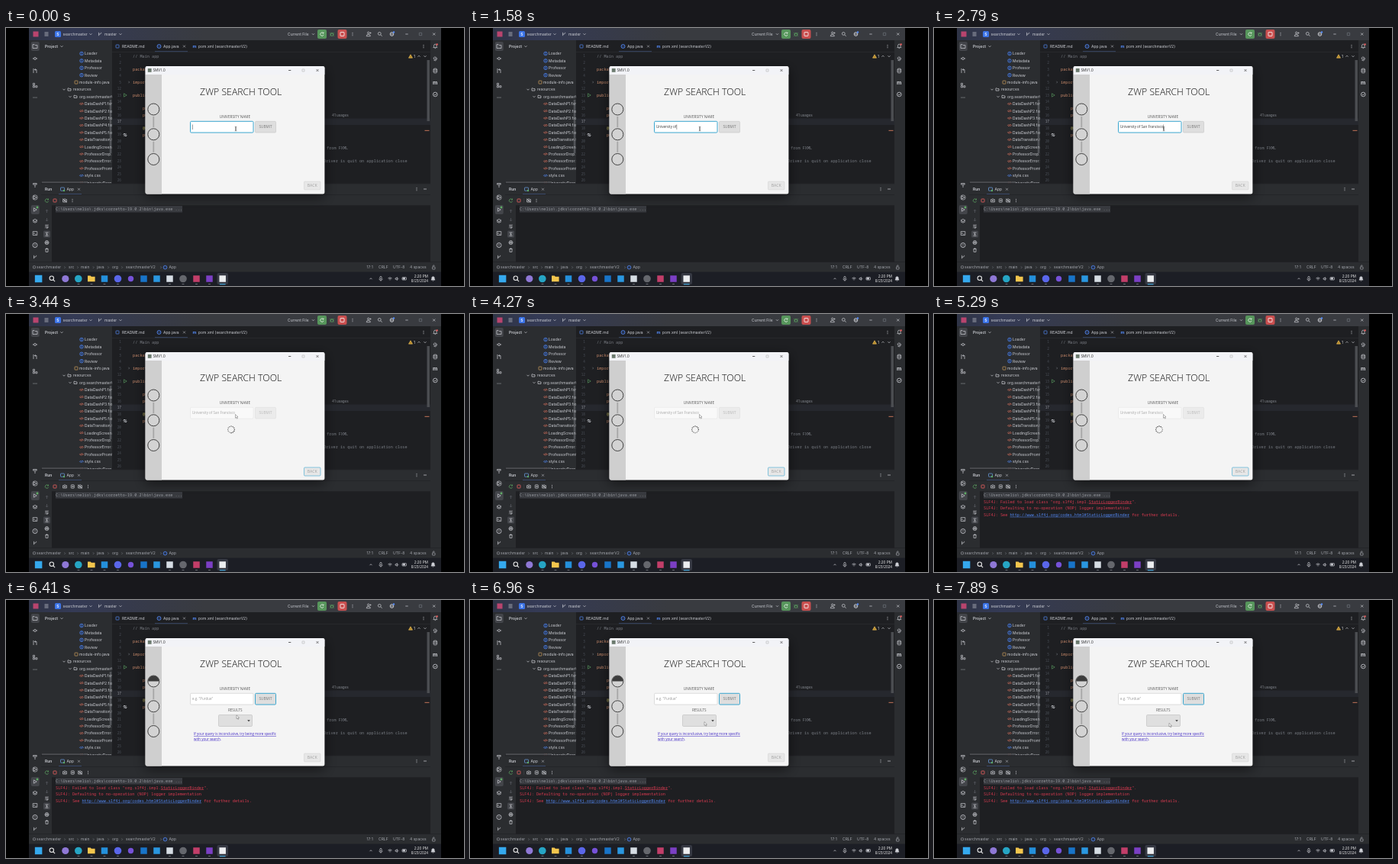
Recreate the animation shown at these times as an HTML page with a canvas. Size 600 by 338 pixels, loop 7.99 s.

```html
<!DOCTYPE html>
<html lang="en">
<head>
<meta charset="utf-8">
<style>
html, body { margin: 0; width: 100%; height: 100%; overflow: hidden; background: #000; }
canvas { display: block; width: 600px; height: 338px; }
</style>
</head>
<body>
<canvas id="stage" width="600" height="338"></canvas>
<script>
const LOOP = 7990, TYPE_START = 370, CHAR_MS = 89.5, TOOLBAR = 2300,
      SUBMIT = 2970, LOG = 4830, RESULT = 5900;
const LEFT = 30, WIDE = 540;
const QUERY = 'University of San Francisco';
const UI = 'Inter, sans-serif', SANS = '"Open Sans", sans-serif', MONO = '"Noto Sans Mono", monospace';
const LIGHT = '#ced0d6', DIM = '#6f737a', BLUE = '#548af7', GREEN = '#57965c', RED = '#db5c5c',
      PANEL = '#2b2d30', DARK = '#1e1f22', TAB_LINE = '#3b4b6b', SCROLL = '#4b4d51', FOCUS = '#3aa6cf';
const stage = document.getElementById('stage');
const ctx = stage.getContext('2d');

// Shaped at ten times the size so that small glyph advances stay exact.
function text(str, x, y, color = LIGHT, size = 5, family = UI, weight = 400, align = 'left') {
  ctx.save();
  ctx.translate(x, y);
  ctx.scale(.1, .1);
  ctx.font = `${weight} ${size * 10}px ${family}`;
  ctx.textAlign = align;
  ctx.fillStyle = color;
  ctx.fillText(str, 0, 0);
  ctx.restore();
}
const mono = (str, x, y, color) => text(str, x, y, color, 5.22, MONO);
const label = (str, x, y, color = '#555', size = 4.7) => text(str, x, y, color, size, SANS, 400, 'center');

function rect(x, y, w, h, fill, r = 0, stroke, lw = .7) {
  ctx.beginPath();
  ctx.roundRect(x, y, w, h, r);
  if (fill) { ctx.fillStyle = fill; ctx.fill(); }
  if (stroke) { ctx.strokeStyle = stroke; ctx.lineWidth = lw; ctx.stroke(); }
}
function disc(x, y, r, fill, stroke, lw = .8) {
  ctx.beginPath();
  ctx.arc(x, y, r, 0, 7);
  if (fill) { ctx.fillStyle = fill; ctx.fill(); }
  if (stroke) { ctx.strokeStyle = stroke; ctx.lineWidth = lw; ctx.stroke(); }
}
function icon(d, x, y, stroke = LIGHT, fill, lw = .7) {
  const p = new Path2D(d);
  ctx.save();
  ctx.translate(x, y);
  if (fill) { ctx.fillStyle = fill; ctx.fill(p); }
  if (stroke) { ctx.strokeStyle = stroke; ctx.lineWidth = lw; ctx.stroke(p); }
  ctx.restore();
}

const ICON = {
  down: 'M-1.5-.7L0 .8 1.5-.7', up: 'M-1.5.7L0-.8 1.5.7', right: 'M-.6-1.3L.7 0-.6 1.3',
  menu: 'M-2.5-2h5M-2.5 0h5M-2.5 2h5', cross: 'M-1.5-1.5l3 3M1.5-1.5l-3 3',
  folder: 'M-3-2.4h2.2l1 1h2.8v3.9h-6z', smallFolder: 'M-2-1.6h1.5l.6.7h1.9v2.5h-4z',
  branch: 'M-1.4-2.2v4.4M1.6-2.2v1q0 1.2-3 1.5',
  commit: 'M-3.2 0h1.7M1.5 0h1.7M1.5 0a1.5 1.5 0 1 0-3 0a1.5 1.5 0 1 0 3 0',
  pull: 'M-2-3v6M2 3v-4.5h-2.5l1.2-1.2M-.5-1.5l1.2 1.2',
  blocks: 'M-2.6-2.6h2.1v2.1h-2.1zM-2.6.7h2.1v2.1h-2.1zM.8.7h2.1v2.1h-2.1z',
  search: 'M1.2-.6a1.9 1.9 0 1 0-3.8 0a1.9 1.9 0 1 0 3.8 0M.7.8l2 2',
  bigSearch: 'M2.2-.8a2.7 2.7 0 1 0-5.4 0a2.7 2.7 0 1 0 5.4 0M1.4 1.2l2.4 2.4',
  person: 'M1.1-1.6a1.3 1.3 0 1 0-2.6 0a1.3 1.3 0 1 0 2.6 0M-2.8 2.7q.2-2.5 2.6-2.5t2.6 2.5zM2.5-2.5v2M1.5-1.5h2',
  rerun: 'M1.8-1.2a2.2 2.2 0 1 0 .3 2M2-2.5v1.5h-1.5', play: 'M-1.6-2.2L2.2 0-1.6 2.2z',
  bug: 'M-1.6-.8h3.2v1.6a1.6 1.7 0 0 1-3.2 0zM-1-.9q1-2 2 0M-2.8-1.6l1.2.8M2.8-1.6l-1.2.8M-2.9.7h1.2M1.7.7h1.2M-2.6 2.6l1.1-.9M2.6 2.6l-1.1-.9',
  camera: 'M-2.4-1.4h1.2l.6-.8h1.2l.6.8h1.2v3.4h-4.8zM.9.2a.9.9 0 1 0-1.8 0a.9.9 0 1 0 1.8 0',
  hammer: 'M-2.4-2.5h4.6v1.6h-4.6zM0-.8v3.8', layers: 'M-3-1l3-1.6 3 1.6-3 1.6zM-3 .6l3 1.6 3-1.6',
  terminal: 'M-2.8-2.4h5.6v4.8h-5.6zM-1.6-1l1 1-1 1M.3 1.2h1.4',
  bell: 'M-2.5 1.6h5l-.8-1.3v-1.4a1.7 1.7 0 0 0-3.4 0v1.4zM-.6 2.6h1.2',
  data: 'M-2.3-2a2.3.9 0 0 1 4.6 0v4a2.3.9 0 0 1-4.6 0zM-2.3-2a2.3.9 0 0 0 4.6 0M-2.3 0a2.3.9 0 0 0 4.6 0',
  spiral: 'M0 0q1-1 1 .4t-2 .6-.9-2.2 3-.4.6 3.2-3.6.6',
  arrowUp: 'M0 2v-4M-1.5-.5L0-2 1.5-.5', arrowDown: 'M0 2v-4M-1.5.5L0 2 1.5.5',
  wrap: 'M-2.3-1.8h4.6M-2.3 0h3.6q1.2.9 0 1.8h-1.6M.6.9l-1 .9 1 .9M-2.3 1.8h1',
  scroll: 'M-2-2h4M-2 2.2h4M0-1.4v2.4M-1.1 0L0 1.1 1.1 0',
  printer: 'M-1.4-.8v-1.4h2.8v1.4M-1.4 1.2h-1v-2h4.8v2h-1M-1.4.5h2.8v1.8h-2.8z',
  bin: 'M-2-1.5h4M-.7-1.6v-.7h1.4v.7M-1.5-1.4v3.7h3v-3.7',
  wifi: 'M-2.5-.6q2.5-2.2 5 0M-1.5.6q1.5-1.4 3 0M-.4 1.6h.8',
  sound: 'M-2-.7h1l1.4-1.2v3.8l-1.4-1.2h-1zM1.3-1q.9 1 0 2',
  code: 'M-1.2-1.2l-1.2 1.2 1.2 1.2M1.2-1.2l1.2 1.2-1.2 1.2M.4-1.5l-.8 3',
  beam: 'M-1.2-2.8q1.2 0 1.2.7v4.2q0 .7-1.2.7M1.2-2.8q-1.2 0-1.2.7v4.2q0 .7 1.2.7',
  arrow: 'M0 0v4.8l1.1-1 .8 1.8.9-.4-.8-1.8h1.5z'
};
const column = (names, x, ys, color) => names.forEach((n, i) => icon(ICON[n], x, ys[i], color));
function dots(x, y, flat) {
  for (let i = -1; i < 2; i++) disc(x + (flat ? i * 2 : 0), y + (flat ? 0 : i * 1.8), .5, LIGHT);
}

function titleBar() {
  const g = ctx.createLinearGradient(LEFT, 0, 260, 0);
  g.addColorStop(0, '#2f3446');
  g.addColorStop(.25, '#343a55');
  g.addColorStop(1, '#393b40');
  rect(LEFT, 0, WIDE, 16, g);
  rect(35.5, 4.5, 7, 7, '#b8446e');
  icon(ICON.menu, 53, 8);
  rect(64, 4, 8, 8, '#3c74e8', 1.5);
  text('S', 68, 9.8, '#fff', 5, UI, 600, 'center');
  text('searchmaster', 74.5, 9.8);
  icon(ICON.down, 111, 8);
  icon(ICON.branch, 123, 8);
  text('master', 129, 9.8);
  icon(ICON.down, 150, 8);
  text('Current File', 369, 9.8);
  icon(ICON.down, 402.5, 8);
  rect(408, 2, 12, 12, '#57965c', 2);
  icon(ICON.rerun, 414, 8, '#fff');
  icon(ICON.bug, 427, 8, '#5fad65');
  rect(434.5, 2, 12, 12, '#c94f4f', 2);
  rect(438, 5.5, 5, 5, null, .6, '#fff', .8);
  dots(454, 8);
  icon(ICON.person, 475, 8);
  icon(ICON.search, 490, 8);
  disc(505.5, 8, 2.3, null, LIGHT, 1);
  disc(505.5, 8, .8, null, LIGHT, .6);
  disc(508, 5.5, 1.2, BLUE);
  icon('M-1.7 0h3.4', 525, 8);
  rect(541.3, 6.3, 3.4, 3.4, null, 0, DIM);
  icon(ICON.cross, 560.7, 8);
}

function projectPanel() {
  text('Project', 51, 25.6, LIGHT, 5, UI, 600);
  icon(ICON.down, 73, 24);
  ctx.save();
  ctx.beginPath();
  ctx.rect(46, 29, 93, 175);
  ctx.clip();
  const files = ['DataDashP1.fxml', 'DataDashP2.fxml', 'DataDashP3.fxml', 'DataDashP4.fxml', 'DataDashP5.fxml',
    'DataTransition.fxml', 'LoadingScreen.fxml', 'ProfessorDrop.fxml', 'ProfessorError.fxml',
    'ProfessorPromt.fxml', 'style.css', 'UniversityDrop.fxml'];
  const rows = ['Loader', 'Metadata', 'Professor', 'Review', 'module-info.java', 'resources', 'org.searchmasterV2', ...files];
  rows.forEach((name, i) => {
    const y = 33.5 + i * 9.4, x = i === 5 ? 88 : i === 4 || i === 6 ? 96 : 103;
    text(name, x, y + 1.9);
    if (i < 4) {
      disc(99, y, 2.3, '#25324d', BLUE, .7);
      text('C', 99, y + 1.3, BLUE, 3.6, UI, 400, 'center');
    } else if (i === 4) {
      rect(90, y - 2, 4, 4, null, .5, '#d0a35c');
    } else if (i < 7) {
      icon(ICON.down, x - 12, y);
      icon(ICON.smallFolder, x - 5, y);
    } else {
      icon(ICON.code, 99, y, name.endsWith('css') ? BLUE : '#d9705c', null, .8);
    }
  });
  rect(135.7, 94, 2.6, 70, 'rgba(140,142,148,.4)');
  rect(47, 201.3, 58, 2.2, SCROLL);
  ctx.restore();
}

function editor() {
  rect(139, 16, 417, 188, DARK);
  rect(139, 118.4, 417, 8.6, '#26282e');
  rect(144, 22, 4, 4, null, .5, BLUE);
  text('README.md', 152, 25.6);
  disc(200.5, 24, 2.5, '#25324d', BLUE);
  text('App.java', 206, 25.6);
  icon(ICON.cross, 233.5, 24, LIGHT, null, .5);
  rect(195, 30.3, 43, 1, TAB_LINE);
  text('m', 247, 25.6, BLUE, 5.5, UI, 700, 'center');
  text('pom.xml (searchmasterV2)', 252, 25.6);
  dots(547, 24);
  rect(139, 31.3, 417, .5, '#303236');
  for (let i = 0; i < 20; i++) {
    const n = i < 5 ? i + 1 : i + 7;
    text(n, 151, 38.4 + i * 8.57, n === 17 ? '#a1a3ab' : '#4b5059', 4.4, MONO, 400, 'right');
  }
  icon(ICON.play, 156, 88, GREEN, null, .7);
  icon(ICON.right, 161, 71, DIM);
  icon(ICON.arrowUp, 155, 140, LIGHT);
  icon(ICON.arrowDown, 157, 140, LIGHT);
  mono('// Main app', 166, 38.8, '#7a7e85');
  const key = '#cf8e6d';
  mono('package', 166, 55.9, key);
  mono('import', 166, 73, key);
  mono('public', 166, 90.2, key);
  mono('public', 179, 107.3, key);
  mono('public', 179, 115.9, key);
  mono('@Override', 179, 133, '#b3ae60');
  mono('public', 179, 141.6, key);
  text('41 usages', 427, 115.9, '#868a91', 4.6);
  mono('from FXML', 420, 158.8, '#7a7e85');
  mono('Driver is quit on application close', 416, 176, '#7a7e85');
  icon('M0-2.2l2.5 4.4h-5z', 530, 37, '#f2c55c', '#b98d2c', .6);
  text('1', 534, 38.8);
  icon(ICON.up, 541, 37);
  icon(ICON.down, 549, 37);
  rect(551.5, 42, 3.5, 80, SCROLL);
  rect(548.5, 133.8, 6, 1.2, '#a8654f');
}

function strips() {
  rect(32.8, 18, 11, 12, '#43454a', 2);
  column(['folder', 'commit', 'pull', 'blocks'], 38, [24, 40, 56, 75]);
  dots(38, 91, true);
  rect(32.8, 232, 11, 12, '#43454a', 2);
  column(['hammer', 'play', 'play', 'layers', 'terminal', 'branch'], 38, [206, 222, 238, 253, 269, 300]);
  disc(38, 222, 3.2, null, LIGHT, .6);
  disc(41, 235, 1.4, '#5fad65');
  disc(38, 284.5, 3, null, LIGHT);
  icon('M0-1.5v1.8M0 1v.7', 38, 284.5);
  column(['bell', 'spiral', 'data'], 562.3, [24, 40, 56]);
  disc(564.6, 21.5, 1.3, RED);
  text('m', 562.3, 74, LIGHT, 7, UI, 700, 'center');
  disc(562.3, 87, 2.8, null, LIGHT);
  icon('M-1.3 0l1 1 1.7-1.8', 562.3, 87);
}

function runPanel(t) {
  rect(46, 203.5, 510, 103, PANEL);
  rect(60, 232.3, 496, 74.2, DARK);
  rect(46, 203.5, 510, .7, DARK);
  rect(46, 218.2, 510, .5, DARK);
  text('Run', 51, 212.8, LIGHT, 5, UI, 600);
  rect(71.5, 209, 5, 4.2, null, .6, '#6ea4e8');
  disc(76, 213, 1.2, '#5fad65');
  text('App', 79.5, 212.8);
  icon(ICON.cross, 95.5, 211.3, LIGHT, null, .5);
  rect(69, 217, 30, 1, TAB_LINE);
  icon('M-2 0h4', 549, 211);
  dots(538, 211);
  icon(ICON.rerun, 53.5, 226, '#5fad65');
  rect(62, 224, 4, 4, null, .5, RED, .9);
  rect(70, 223, .5, 6, '#43454a');
  icon(ICON.camera, 77, 226);
  if (t >= TOOLBAR) {
    rect(85.3, 223.8, 4, 4.4, null, .6, LIGHT);
    icon('M-1.2 0h2.2M0-1l1 1-1 1', 87.3, 226);
    icon(ICON.camera, 97, 226);
    icon('M-2.6-2.4l5.2 4.8', 97, 226);
    dots(107.5, 226);
  } else {
    icon('M-2.6-2.4l5.2 4.8', 77, 226);
    dots(87, 226);
  }
  rect(49, 265.5, 9, 9, '#43454a', 1.5);
  column(['arrowUp', 'arrowDown'], 53.5, [240, 251], '#5c5f66');
  column(['wrap', 'scroll', 'printer', 'bin'], 53.5, [260, 270, 281, 291]);

  rect(65, 233, 166, 8.4, '#393b40');
  mono('C:\\Users\\nelio\\.jdks\\corretto-19.0.2\\bin\\java.exe ...', 65, 239, '#9b9ea4');
  if (t < LOG) return;
  const err = '#d93a50', cell = 3.132;
  mono('SLF4J: Failed to load class "org.slf4j.impl.StaticLoggerBinder".', 65, 247.7, err);
  rect(65 + 44 * cell, 248.6, 18 * cell, .5, err);
  mono('SLF4J: Defaulting to no-operation (NOP) logger implementation', 65, 256.3, err);
  mono('SLF4J: See', 65, 264.9, err);
  mono('http://www.slf4j.org/codes.html#StaticLoggerBinder', 65 + 11 * cell, 264.9, BLUE);
  rect(65 + 11 * cell, 265.8, 50 * cell, .5, BLUE);
  mono('for further details.', 65 + 62 * cell, 264.9, err);
}

function statusBar() {
  rect(LEFT, 306.5, WIDE, .6, DARK);
  const grey = '#a4a7ae';
  rect(35.5, 311.8, 3, 3, null, .5, grey, .6);
  [['searchmaster', 40], ['src', 82], ['main', 98], ['java', 119], ['org', 139], ['searchmasterV2', 157], ['App', 213.5],
   ['17:1', 472.5], ['CRLF', 488], ['UTF-8', 507], ['4 spaces', 529]].forEach(([s, x]) => text(s, x, 315.4, grey));
  [77, 94, 114.5, 134, 152, 203].forEach(x => icon(ICON.right, x, 313.6, DIM));
  disc(208.5, 313.6, 2.3, '#25324d', BLUE);
  rect(558.5, 313, 3.6, 3, null, .4, grey);
  icon('M-1-.2v-1a1 1 0 0 1 2 0', 560.3, 313, grey);
}

function taskbar() {
  rect(LEFT, 319.5, WIDE, 18.5, '#1c1e25');
  rect(276.5, 321, 14.5, 15, '#363943', 2);
  const mid = 328.5;
  const tile = (x, c, s = 8.5) => rect(x - s / 2, mid - s / 2, s, s, c);
  tile(42.6, '#35a9ee', 9.5);
  icon(ICON.bigSearch, 60.3, mid, '#e6e6e6', null, 1.1);
  disc(77.8, mid, 4.6, '#8f78d6');
  disc(94.8, mid, 4.8, '#26a5c4');
  icon('M-4.8-4h3.6l1.3 1.3h4.7v6.4h-9.6z', 111.8, mid, null, '#f3c54d');
  tile(129, '#2490dc');
  disc(146.5, mid, 4.8, '#5a66ea');
  disc(163.5, mid, 3.7, '#7651d8');
  tile(180.5, '#1874c9');
  tile(197.5, '#2a97e0');
  tile(214.5, '#d6dde4');
  disc(232, mid, 4.8, '#65676d');
  tile(249.5, '#c23e69');
  tile(266.5, '#7b3fc4');
  tile(283.7, '#eceef0');
  [95, 112, 129, 146.5, 214.5, 232, 249.5, 266.5].forEach(x => rect(x - 1.5, 335.2, 3, .9, '#85888f', .4));
  rect(279.7, 335.2, 8, 1, '#4cc2ff', .4);
  icon(ICON.up, 478, mid);
  rect(489.9, 325.4, 2.2, 3.6, null, 1.1, LIGHT);
  icon('M-2.1 0q0 2 2.1 2t2.1-2M0 2v1.2', 491, mid);
  icon(ICON.wifi, 503, mid);
  icon(ICON.sound, 512, mid);
  rect(519, 326.6, 5.5, 3.4, null, .7, LIGHT);
  rect(519.6, 327.2, 3.4, 2.2, LIGHT);
  text('2:20 PM', 553, 326.8, '#eee', 4.9, SANS, 400, 'right');
  text('8/23/2024', 553, 333.4, '#eee', 4.7, SANS, 400, 'right');
  icon(ICON.bell, 559.5, mid, LIGHT, LIGHT);
}

function button(str, x, y, w, h, focused, alpha) {
  ctx.globalAlpha = alpha;
  rect(x, y, w, h, '#dedede', 1.2, focused ? FOCUS : '#c4c4c4', focused ? 1 : .6);
  label(str, x + w / 2, y + h / 2 + 1.7, '#777', str === 'BACK' ? 5.2 : 4.65);
  ctx.globalAlpha = 1;
}

function appFrame() {
  ctx.save();
  ctx.shadowColor = 'rgba(0,0,0,.55)';
  ctx.shadowBlur = 16;
  ctx.shadowOffsetY = 4;
  rect(182.6, 50, 234.8, 167.4, '#f4f4f4', 2.5);
  ctx.restore();
  rect(182.6, 50, 234.8, 11, '#f2f3f7', [2.5, 2.5, 0, 0]);
  rect(182.6, 61, 21.4, 156.4, '#cfcfcf', [0, 0, 0, 2.5]);
  rect(185.8, 53, 4.8, 4.8, '#6b7a6e');
  text('SMV1.0', 192.5, 57.2, '#222', 4.7, SANS);
  icon('M-1.6 0h3.2', 371.7, 55.5, '#222');
  rect(388, 54, 3, 3, null, 0, '#aaa', .5);
  icon(ICON.cross, 408, 55.5, '#333', null, .6);
  rect(192.4, 116, 1.8, 14, '#a6a6a6');
  rect(192.4, 148.8, 1.8, 14, '#a6a6a6');
  [106.5, 139.3, 172].forEach(y => disc(193.3, y, 7.5, '#d3d3d3', '#333', .9));
  text('ZWP SEARCH TOOL', 307.7, 88.3, '#111', 12.25, SANS, 300, 'center');
  label('UNIVERSITY NAME', 300, 117.8);
}

function spinner(t) {
  const step = Math.floor((t - SUBMIT) / 100);
  for (let i = 0; i < 12; i++) {
    const a = i * Math.PI / 6;
    ctx.globalAlpha = .5 + .5 * ((i - step % 12 + 12) % 12) / 11;
    disc(295 + 4.3 * Math.cos(a), 151.4 + 4.3 * Math.sin(a), .75, '#333');
  }
  ctx.globalAlpha = 1;
}

function results() {
  ctx.beginPath();
  ctx.arc(193.3, 106.5, 7.2, Math.PI, 0);
  ctx.fillStyle = '#3c3c3c';
  ctx.fill();
  label('RESULTS', 300.2, 146.1, '#555', 4.6);
  rect(278.5, 150.5, 44, 15, '#dfdfdf', 1.2, '#bdbdbd', .6);
  icon('M-1.8-.9h3.6L0 1.1z', 318, 158.2, null, '#333');
  const link = '#3f27c4';
  text('If your query is inconclusive, try being more specific', 246, 177.2, link, 4.5, SANS);
  text('with your search.', 246, 183.6, link, 4.5, SANS);
  rect(246, 178, 108, .45, link);
  rect(246, 184.4, 34.5, .45, link);
}

function form(t) {
  const loading = t >= SUBMIT && t < RESULT, done = t >= RESULT, editing = t < SUBMIT;
  const typed = QUERY.slice(0, Math.max(0, Math.floor((t - TYPE_START) / CHAR_MS)));
  ctx.globalAlpha = loading ? .42 : 1;
  rect(241.5, 122.3, 82.5, 14.7, '#fff', 1.2, editing ? FOCUS : '#c8c8c8', editing ? 1 : .6);
  if (done) text('e.g. "Purdue"', 244, 131.4, '#999', 4.5, SANS);
  else text(typed, 244, 131.4, '#333', 4.5, SANS);
  ctx.globalAlpha = 1;
  if (editing) {
    ctx.font = `45px ${SANS}`;
    rect(244.3 + ctx.measureText(typed).width / 10, 126.5, .5, 6.4, '#444');
  }
  button('SUBMIT', 326.5, 122.3, 27, 14.7, done, loading ? .42 : 1);
  button('BACK', 390.5, 201, 21.5, 11, loading, .6);
  if (loading) spinner(t);
  if (done) results();
}

function pointer(t) {
  if (t < SUBMIT) {
    icon(ICON.beam, 301, 132, '#444', null, .6);
    return;
  }
  const part = (a, b) => Math.min(1, Math.max(0, (t - a) / (b - a)));
  const p = part(6000, 6400), q = part(6450, 7060);
  icon(ICON.arrow, 300.5 + 1.5 * p + 6 * q, 131.5 + 19.3 * p + 10.5 * q, '#666', '#fff', .5);
}

function draw(t) {
  rect(0, 0, 600, 338, '#000');
  rect(LEFT, 0, WIDE, 338, PANEL);
  titleBar();
  projectPanel();
  editor();
  runPanel(t);
  strips();
  statusBar();
  taskbar();
  appFrame();
  form(t);
  pointer(t);
}

const start = performance.now();
function tick() {
  draw((performance.now() - start) % LOOP);
  requestAnimationFrame(tick);
}
tick();
</script>
</body>
</html>
```
